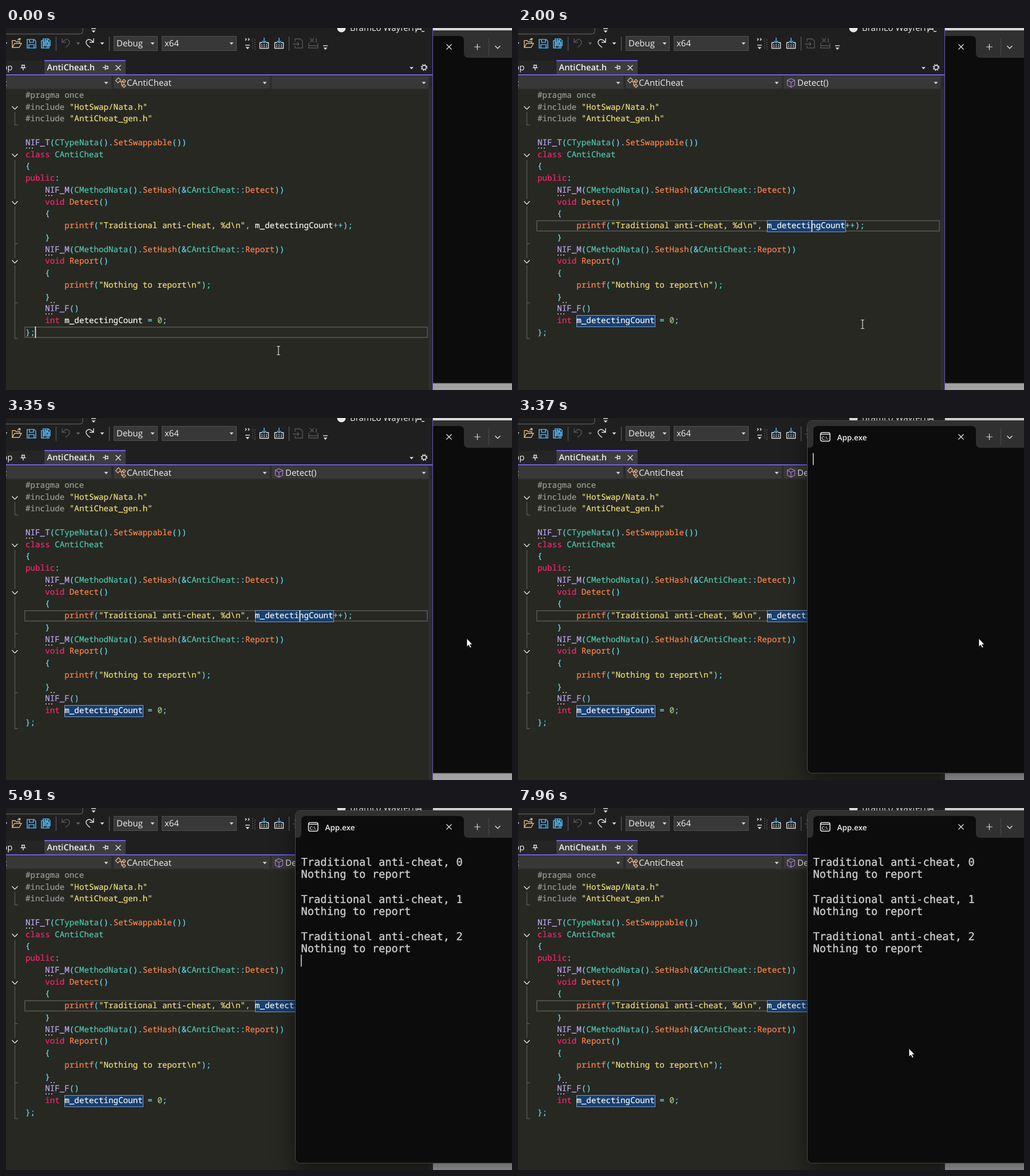
An HTML page that plays this animation: 884x633 px, repeating every 7990 ms.

```html
<!DOCTYPE html>
<html lang="en">
<head>
<meta charset="utf-8">
<title>Editor and console</title>
<style>
html, body { margin: 0; width: 100%; height: 100%; overflow: hidden; background: #1f1f1f; }
#stage { position: relative; width: 884px; height: 633px; overflow: hidden; background: linear-gradient(#dcdcdc 10%, #b4b4b4 90%); }
svg { position: absolute; left: 0; top: 0; width: 884px; height: 633px; }
#editor { z-index: 1; }
#mouse { z-index: 3; }
text { white-space: pre; text-rendering: geometricPrecision; }
.ui { font: 15px "Open Sans", "Noto Sans", sans-serif; fill: #f0f0f0; }
.bold { font-weight: 600; }
.code { font: 14.22px "Noto Sans Mono", "DejaVu Sans Mono", monospace; stroke-width: .2; }
.term { font: 18.75px "DejaVu Sans Mono", monospace; fill: #ccc; stroke: #ccc; stroke-width: .35; }
.ln { fill: none; stroke: #e0e0e0; stroke-width: 1.4; }
.dim { fill: none; stroke: #555; stroke-width: 1.4; }
.blue { fill: none; stroke: #4fa8e0; stroke-width: 1.7; }
</style>
</head>
<body>
<div id="stage">
  <svg id="console"></svg>
  <svg id="editor"></svg>
  <svg id="mouse">
    <path id="arrow" d="M0-.5V14l3.4-3.1 2.4 5.2 2.3-1-2.3-5.1h4.4z" fill="#fff" stroke="#000" stroke-width=".8"/>
    <path id="beam" d="M-3-7.5h2.2l.8.8.8-.8H3M0-6.7V6.7M-3 7.5h2.2l.8-.8.8.8H3" fill="none" stroke="#ddd" stroke-width="1.2"/>
  </svg>
</div>
<script>
const LOOP = 7990;
const CH = 8.532, ROW = 20.75, LEFT = 34, TOP = 107.3;
const T_CH = 21.67, T_TOP = 61.3;
const $ = id => document.getElementById(id);

const rect = (x, y, w, h, fill, more = '') => `<rect x="${x}" y="${y}" width="${w}" height="${h}" fill="${fill}" ${more}/>`;
const path = (d, cls = 'ln', more = '') => `<path d="${d}" class="${cls}" ${more}/>`;
const label = (x, y, s, cls = 'ui', more = '') => `<text x="${x}" y="${y}" class="${cls}" ${more}>${s}</text>`;
const drop = (x, y, c = '#d8d8d8') => `<path d="M${x - 3.5} ${y - 1.8}h7l-3.5 4z" fill="${c}"/>`;
const chevron = (x, y, r = 5) => path(`M${x - r} ${y - r / 2}l${r} ${r}l${r}-${r}`);
const cross = (x, y, r) => path(`M${x - r} ${y - r}l${2 * r} ${2 * r}m0 ${-2 * r}l${-2 * r} ${2 * r}`);
const esc = s => s.replace(/&/g, '&amp;').replace(/</g, '&lt;');

// ---- code ----
const source = `#pragma once
#include "HotSwap/Nata.h"
#include "AntiCheat_gen.h"

NIF_T(CTypeNata().SetSwappable())
class CAntiCheat
{
public:
    NIF_M(CMethodNata().SetHash(&CAntiCheat::Detect))
    void Detect()
    {
        printf("Traditional anti-cheat, %d\\n", m_detectingCount++);
    }
    NIF_M(CMethodNata().SetHash(&CAntiCheat::Report))
    void Report()
    {
        printf("Nothing to report\\n");
    }
    NIF_F()
    int m_detectingCount = 0;
};`.split('\n');

const syntax = [
  [/^#\w+( once)?/, '#9b9b9b'],
  [/^"[^"]*"/, '#efe07a'],
  [/^(class|public|void|int)\b/, '#f92672'],
  [/^NIF_\w/, '#bfa8f5'],
  [/^C[A-Z]\w+/, '#4ec9b0'],
  [/^(printf|Detect|Report|Set\w+)/, '#fc8550'],
  [/^\d+/, '#a6c37a'],
  [/^\w+/, '#f8f8f2'],
  [/^\s+/, '#fff'],
  [/^[^\w\s"]+/, '#66d9ef']
];

function highlight(line) {
  let out = '';
  while (line) {
    const [re, color] = syntax.find(([re]) => re.test(line));
    const word = line.match(re)[0];
    out += `<tspan fill="${color}" stroke="${color}">${esc(word)}</tspan>`;
    line = line.slice(word.length);
  }
  return out;
}

const colX = c => LEFT + c * CH;
const rowY = r => Math.round(TOP + r * ROW);
const code = source.map((s, r) => label(LEFT, TOP + r * ROW + 14.6, highlight(s), 'code')).join('');
const hints = [[35, 209], [69, 292], [69, 396], [69, 499], [78, 479]]
  .map(([x, y], i) => [0, 5, 10].slice(0, i === 4 ? 2 : 3).map(d => rect(x + d, y, 2, 2, '#a8a8a8')).join('')).join('');
const refs = [[47, 11], [8, 19]]
  .map(([c, r]) => rect(Math.round(colX(c)) + .5, rowY(r) + .5, 137, 20, '#183f70', 'stroke="#7d9cc0"')).join('');
const folds = path('M15.5 147V169.500H21M15.500 231V543H21M15.500 377H21M15.500 480.500H21', 'dim')
  + [139, 222, 305, 408].map(y => rect(8, y - 6, 15, 13, '#272822') + chevron(15.5, y + .5)).join('');

// ---- editor chrome ----
const floppy = (x, y, s) => path(`M${x} ${y}h${s - 3}l3 3v${s - 3}h${-s}zM${x + 4} ${y}v5h${s - 8}v-5M${x + 3} ${y + s}v-6h${s - 6}v6`, 'blue');
const combo = (x, w, s) => rect(x + .5, 14.5, w, 25, '#383838', 'stroke="#505050"') + label(x + 5, 32, s) + drop(x + w - 8, 27);
const loader = x => path(`M${x - 3} 25.500h-4.500v10h15v-10h-4.500`)
  + path(`M${x - 5} 29.500h11M${x - 5} 32.500h11`, 'ln', 'stroke-dasharray="2 2"')
  + path(`M${x} 17v9m-3.500-3.500l3.500 3.500l3.500-3.500`, 'blue');
const more = (x, y) => path(`M${x - 4} ${y}h8`) + drop(x, y + 5);

const toolbar = path('M-5 10.500H129q5 0 5-5V-4', 'dim') + more(153, 1)
  + drop(-1, 27)
  + path('M11 34V22h5l2 2h6v3M11 34l4-7h12l-4 7zM20 21l5-2m-3-1l3 1l-1 3', 'ln', 'style="stroke:#dcb67a"')
  + floppy(37, 20, 15) + floppy(65, 19, 12) + floppy(62, 22, 13)
  + path('M87.500 15V40M180.500 15V40M494.500 15V40', 'dim')
  + path('M98 18v7h7M98 25q7-8 12-3q4 5-6 12', 'dim') + drop(126, 27, '#666')
  + path('M153 18v7h-7M153 25q-7-8-12-3q-4 5 6 12') + drop(168, 27)
  + combo(188, 76, 'Debug') + combo(272, 130, 'x64')
  + path('M418 18l2 2l-2 2m5-4l2 2l-2 2') + more(422, 30)
  + path('M431 18V38M435 20V38', 'dim', 'stroke-dasharray="2 2"')
  + loader(451) + loader(477)
  + path('M505 24v-5h9l4 4v12h-13v-4M501 28h11m-3-3l3 3l-3 3', 'dim')
  + path('M529 26v9h16v-9M529 31h16M531 18l7 7m0-7l-7 7M542 18v8', 'dim') + more(558, 31)
  + '<circle cx="586" cy="0" r="7.500" fill="#e8e8e8"/>'
  + label(601, 5, 'BramLo Wayfern')
  + path('M716 8q0-6 6-6q3 0 4 2M718-2a4 4 0 0 0 8 0M726 6h5');

const tabs = rect(0, 57, 66, 24, '#252525') + rect(67, 56, 142, 26, '#3d3d3d') + rect(67, 56, 142, 2, '#7160e8')
  + label(-7, 74, 'pp') + path('M27 65h6M28 65v4M32 65v4M25.500 69.500h9M30 70v4')
  + label(71.5, 74.3, 'AntiCheat.h', 'ui bold', 'style="font-size:14.7px"')
  + path('M178 66v6M178 67h-4M178 71h-4M173.500 64.500v9M173 69h-4') + cross(196, 69.5, 4.5)
  + drop(708.5, 70) + '<circle cx="730.500" cy="69" r="3.500" class="ln"/>'
  + '<circle cx="730.500" cy="69" r="5" fill="none" stroke="#e0e0e0" stroke-width="1.800" stroke-dasharray="2 1.930"/>'
  + rect(0, 81, 745, 2, '#7160e8');

const nav = rect(0, 83, 746, 25, '#2b2b2b') + rect(0, 84, 184, 22, '#383838') + rect(188, 84, 273, 22, '#383838') + rect(464, 84, 274, 22, '#383838')
  + drop(175, 96) + drop(452, 96) + drop(730, 96) + label(-2, 101, ':')
  + path('M191.500 92l5-5l4 4l-5 5zM199 94h7M202 94v6h3M203 93l3-3l3 3l-3 3zM203 101l3-3l3 3l-3 3z', 'ln', 'style="stroke:#e0b080"')
  + label(211, 101, 'CAntiCheat')
  + '<g id="member">' + path('M477 88.500l6.500 3v8.500l-6.500 3.500l-6.500-3.500v-8.500zM470.500 91.500l6.500 3.500l6.500-3.500M477 95v8.500', 'ln', 'style="stroke:#a57fd6;stroke-width:1.200"')
  + label(488, 101, 'Detect()') + '</g>';

$('editor').innerHTML = rect(0, 0, 746, 633, '#1f1f1f') + toolbar + tabs + nav
  + rect(0, 108, 738, 525, '#272822') + rect(738, 108, 7, 525, '#2e2e2e') + folds
  + rect(33, 0, 703, 18, 'none', 'id="current" stroke="#4c4c4a" stroke-width="2"')
  + `<g id="refs">${refs}</g>` + code + hints
  + rect(0, 0, 1.6, 20, '#f4f4f4', 'id="caret"')
  + rect(745, 0, 1, 633, '#6558c0', 'id="edge"');

// ---- console ----
const runs = [0, 1, 2].map(n => {
  const y = T_TOP + 17.8 + T_CH * (1 + 3 * n);
  return label(515.5, y, `Traditional anti-cheat, ${n}`, 'term', `id="head${n}"`)
    + label(515.5, y + T_CH, 'Nothing to report', 'term', `id="tail${n}"`);
}).join('');

$('console').innerHTML = '<defs><filter id="soft" x="-30%" y="-30%" width="160%" height="160%"><feGaussianBlur stdDeviation="20"/></filter></defs>'
  + rect(506, 24, 420, 612, '#000', 'id="shade" filter="url(#soft)"')
  + rect(505.5, 4.5, 400, 616.5, '#0c0c0c', 'rx="8" stroke="#484848"')
  + '<path d="M506 52V13q0-8 8-8H884V52z" fill="#303030"/>'
  + '<path d="M508 52q8 0 8-8V22q0-8 8-8H792q8 0 8 8V44q0 8 8 8z" fill="#0c0c0c"/>'
  + rect(528.5, 25.5, 16.5, 15, 'none', 'rx="3" stroke="#eee" stroke-width="1.500"') + path('M529 28.500h16')
  + label(530.5, 38, 'C:\\', 'ui bold', 'style="font-size:8px"')
  + label(557.5, 38.5, 'App.exe', 'ui bold', 'style="font-size:13.500px"')
  + cross(774, 33, 4.5) + path('M823.500 27.500v11M818 33h11', 'ln', 'style="stroke-width:1.200"')
  + rect(843, 18, 1, 30, '#4a4a4a') + chevron(859, 33.5, 4.5)
  + runs + rect(515, 0, 1.5, 21, '#ddd', 'id="prompt"');

// ---- timing ----
const CLICK = 950, FRONT = 3370;
// time, x, y: eased between entries
const moves = [
  [200, 476, 564], [930, 513, 346], [1070, 513, 346], [1340, 601, 517], [1480, 601, 517], [1500, 602, 518],
  [2460, 602, 518], [3170, 805.5, 386], [3540, 805.5, 386], [3980, 755, 424],
  [7040, 752, 424], [7310, 732, 422], [7480, 732, 422], [7720, 723, 421], [7890, 723, 421], [7960, 683, 421]
];
// time, caret row, caret visible
const prompts = [
  [3370, 0, 1], [3900, 0, 0], [4440, 0, 1], [4620, 3, 1], [5270, 3, 0], [5350, 6, 1],
  [5860, 7, 1], [5890, 8, 1], [5910, 9, 1], [6570, 9, 0], [7100, 9, 1], [7630, 9, 0]
];
const heads = [4620, 5350, 5890], tails = [4620, 5350, 5910];

const within = (t, a, b) => t >= a && t < b;
const show = (id, on) => { $(id).style.display = on ? '' : 'none'; };
const ease = u => u * u * (3 - 2 * u);

function mouseAt(t) {
  const i = moves.findIndex(m => m[0] > t);
  if (i < 0) return moves[moves.length - 1].slice(1);
  if (i === 0) return moves[0].slice(1);
  const [t0, x0, y0] = moves[i - 1], [t1, x1, y1] = moves[i];
  const k = ease((t - t0) / (t1 - t0));
  return [x0 + (x1 - x0) * k, y0 + (y1 - y0) * k];
}

function draw(t) {
  const clicked = t >= CLICK, front = t >= FRONT;
  const row = clicked ? 11 : 20;
  $('current').setAttribute('y', rowY(row) + 1);
  $('caret').setAttribute('x', clicked ? 512.6 : 50.7);
  $('caret').setAttribute('y', rowY(row));
  show('caret', !within(t, 1480, 2000) && !within(t, 2530, 3060));
  show('refs', t >= 970);
  show('member', t >= 1060);

  $('console').style.zIndex = front ? 2 : 0;
  $('edge').setAttribute('fill', front ? '#3d3d3d' : '#6558c0');
  $('shade').setAttribute('opacity', front ? .5 : .15);
  heads.forEach((at, n) => show('head' + n, t >= at));
  tails.forEach((at, n) => show('tail' + n, t >= at));
  const state = prompts.filter(p => p[0] <= t).pop();
  show('prompt', state && state[2]);
  if (state) $('prompt').setAttribute('y', T_TOP + T_CH * state[1]);

  const [x, y] = mouseAt(t).map(Math.floor);
  const hidden = within(t, 4600, 5090) || within(t, 5330, 7040);
  const text = !front && x < 738;
  show('beam', text);
  show('arrow', !text && !hidden);
  $(text ? 'beam' : 'arrow').setAttribute('transform', `translate(${x} ${y})`);
}

const start = performance.now();
function tick() {
  draw((performance.now() - start) % LOOP);
  requestAnimationFrame(tick);
}
tick();
</script>
</body>
</html>
```
